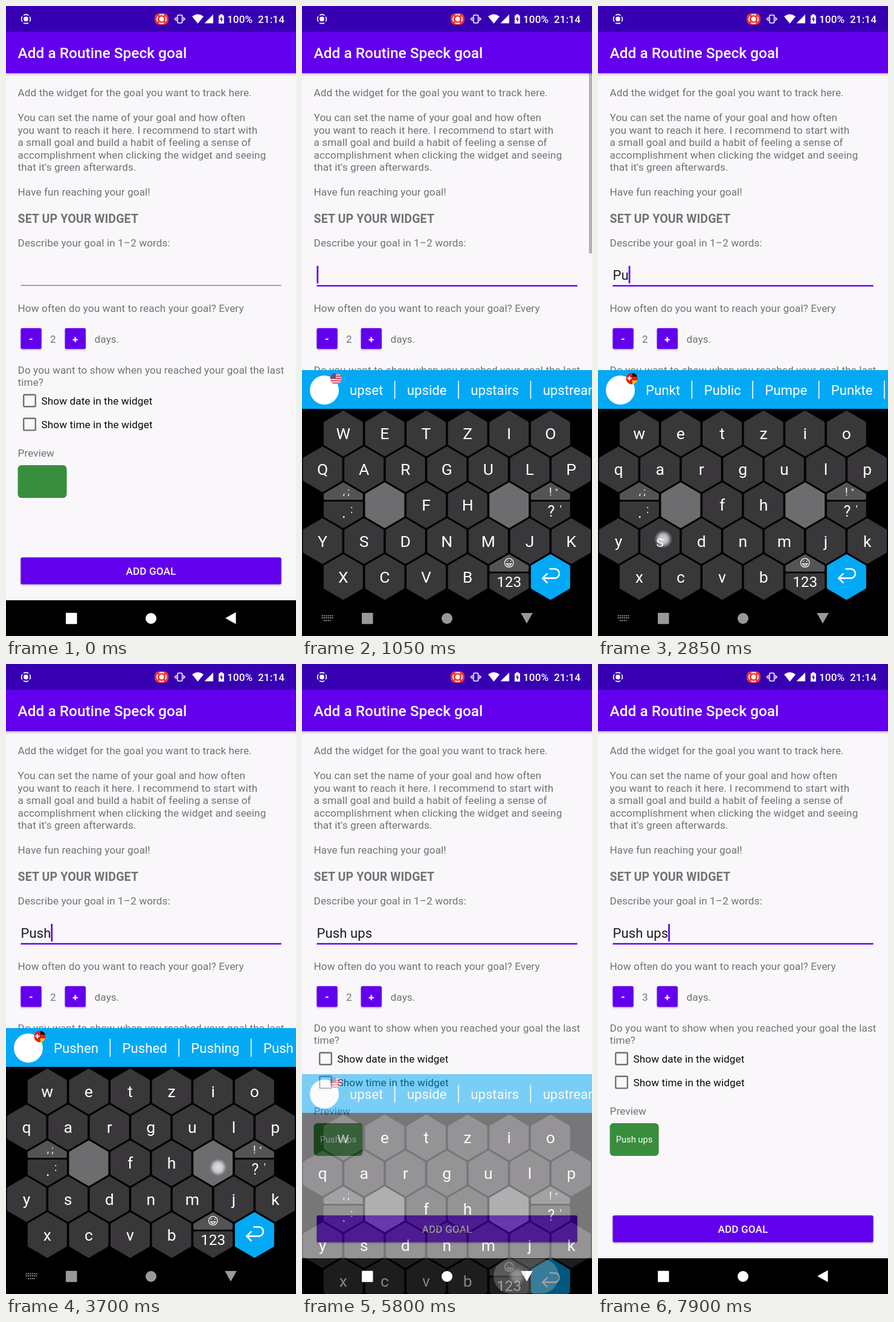
These frames come from a looping animation (480 px wide and 1040 px high, 8 s). An HTML page:

```html
<!DOCTYPE html>
<html lang="en">
<head>
<meta charset="utf-8">
<title>Goal setup</title>
<style>
  html, body { margin: 0; width: 100%; height: 100%; overflow: hidden; background: #f9f7fa; }
  svg { display: block; width: 100vw; height: 100vh; font-family: Roboto, sans-serif; }
  text { white-space: pre; }
  .m { text-anchor: middle; }
  .w { fill: #fff; }
  .med { font-weight: 500; }
  .body { font-size: 17.11px; letter-spacing: .11px; }
</style>
</head>
<body>
<svg id="stage" viewBox="0 0 480 1040" preserveAspectRatio="none">
  <defs>
    <filter id="shade" x="-20%" y="-30%" width="140%" height="170%">
      <feDropShadow dx="0" dy="1.5" stdDeviation="1.3" flood-color="#000" flood-opacity=".33"/>
    </filter>
    <linearGradient id="barShade" x1="0" y1="0" x2="0" y2="1">
      <stop offset="0" stop-color="#000" stop-opacity=".2"/>
      <stop offset="1" stop-color="#000" stop-opacity="0"/>
    </linearGradient>
    <radialGradient id="dot">
      <stop offset="0" stop-color="#fff" stop-opacity=".8"/>
      <stop offset=".55" stop-color="#f4f4fa" stop-opacity=".68"/>
      <stop offset=".8" stop-color="#dcdcea" stop-opacity=".4"/>
      <stop offset="1" stop-color="#70707c" stop-opacity=".22"/>
    </radialGradient>
    <clipPath id="badge"><circle cx="56" cy="615" r="9.5"/></clipPath>
    <clipPath id="plusBox"><rect x="97.6" y="531.7" width="34.3" height="34.4" rx="2.5"/></clipPath>
    <g id="rec" fill="none" stroke="#fff">
      <circle r="3.9" fill="#fff" stroke="none"/>
      <circle r="7.4" stroke-width="1.7" stroke-dasharray="8.6 3.02" stroke-dashoffset="4.3"/>
    </g>
  </defs>

  <rect width="480" height="1040" fill="#f9f7fa"/>
  <g id="page" class="body" fill="#727174"></g>

  <g id="form">
    <rect id="rule" x="24.4" y="460.7" width="431.2"/>
    <text id="input" x="24.4" y="452" font-size="22" letter-spacing=".13" fill="#1c1b1d"></text>
    <rect id="caret" y="429" width="2.7" height="29" fill="#6200ee"/>
    <g filter="url(#shade)" fill="#6200ee">
      <rect x="24.4" y="531.7" width="34.3" height="34.4" rx="2.5"/>
      <rect x="97.6" y="531.7" width="34.3" height="34.4" rx="2.5"/>
      <rect x="24.4" y="910.2" width="431.2" height="44.2" rx="2.5"/>
    </g>
    <circle id="plusGlow" cx="115" cy="549" r="24" fill="#fff" clip-path="url(#plusBox)"/>
    <g class="w m body">
      <text x="41.5" y="555" font-weight="700">-</text>
      <text x="114.7" y="556" font-weight="700">+</text>
      <text x="240" y="939" class="med">ADD GOAL</text>
    </g>
    <text id="count" class="body" x="73" y="556" fill="#727174"></text>
    <g fill="none" stroke="#727174" stroke-width="2.4">
      <rect x="29.2" y="641.7" width="19.6" height="19.6" rx="1.6"/>
      <rect x="29.2" y="680.8" width="19.6" height="19.6" rx="1.6"/>
    </g>
    <rect x="19.5" y="758" width="81" height="54" rx="6" fill="#388e3c"/>
    <text id="mini" class="w m" x="60" y="790.3" font-size="14.67"></text>
  </g>
  <rect id="cover" y="601" width="480" height="381" fill="#f9f7fa"/>
  <rect id="scroll" x="475" y="111" width="5" height="297.5" fill="#b3b1b5"/>

  <rect y="111" width="480" height="5" fill="url(#barShade)"/>
  <rect y="42" width="480" height="69" fill="#6200ee"/>
  <rect width="480" height="42.5" fill="#3700b3"/>
  <text class="w med" x="19.56" y="86.4" font-size="24.44">Add a Routine Speck goal</text>

  <g class="w">
    <use href="#rec" x="33" y="21.5"/>
    <rect x="246" y="12" width="23" height="19" rx="8" fill="#e53935"/>
    <use href="#rec" x="257.5" y="21.5"/>
    <rect x="284" y="15" width="7.6" height="13" rx="1" fill="none" stroke="#fff" stroke-width="1.6"/>
    <path d="M281.6 18v7M294 18v7M279.6 20v3M296 20v3" stroke="#fff" stroke-width="1.4"/>
    <path d="M317.5 29L308 17.2Q317.5 10 327 17.2Z"/>
    <path d="M328.5 28.5H343V14Z"/>
    <path d="M352 15.5h2.4v-2h4v2h2.4v13.5h-8.8z"/>
    <path d="M357 17l-3 5.4h2v4.6l3-5.6h-2z" fill="#3700b3"/>
    <g class="med body"><text x="366" y="28">100%</text><text x="417" y="28">21:14</text></g>
  </g>

  <rect y="981" width="480" height="59" fill="#000"/>
  <g id="board">
    <rect y="664" width="480" height="377" fill="#000"/>
    <rect y="601" width="480" height="64" fill="#03a9f4"/>
    <circle cx="37" cy="634" r="24" class="w"/>
    <g clip-path="url(#badge)">
      <g id="us">
        <rect x="46" y="605" width="20" height="20" fill="#f4f0f2"/>
        <path d="M46 607.2h20M46 611h20M46 614.8h20M46 618.6h20M46 622.4h20" stroke="#d0354a" stroke-width="1.9"/>
        <rect x="46" y="605" width="10" height="10" fill="#4a5a9a"/>
      </g>
      <g id="de">
        <rect x="46" y="605" width="20" height="20" fill="#e02020"/>
        <path d="M57 605h9v7h-9z" fill="#111"/>
        <path d="M57 618h9v7h-9z" fill="#fc0"/>
        <path d="M52 611v7M48.5 614.5h7" stroke="#fff" stroke-width="2.2"/>
      </g>
    </g>
    <g id="words" class="w" font-size="22.2"></g>
    <g id="keys"></g>
  </g>
  <rect id="ripple" x="317" y="982" width="108" height="57" rx="28.5" fill="#fff"/>
  <g id="nav">
    <rect x="99" y="1001.7" width="18.5" height="18.5" rx="1"/>
    <circle cx="240" cy="1011" r="9"/>
    <path id="back" d="M8.5-9.8V9.8L-9 0Z"/>
    <path id="kbd" d="M32.5 1006.5h19M32.5 1010h19M36 1014.5h12" fill="none" stroke="#8a8a8a" stroke-width="2" stroke-dasharray="2.2 1.2"/>
  </g>
  <circle id="touch" r="14" fill="url(#dot)" stroke="#8c8ca0" stroke-opacity=".3"/>
</svg>
<script>
const LOOP = 8000;
const $ = id => document.getElementById(id);
const set = (el, attrs) => { for (const k in attrs) el.setAttribute(k, attrs[k]); };
const add = (parent, tag, attrs, text) => {
  const el = document.createElementNS("http://www.w3.org/2000/svg", tag);
  set(el, attrs);
  if (text) el.textContent = text;
  parent.appendChild(el);
  return el;
};
const ramp = (t, start, length) => Math.min(1, Math.max(0, (t - start) / length));
const within = (t, a, b) => t >= a && t < b;

// Static page text: [baseline, text]
const MARGIN = 19.56;
[
  [149.4, "Add the widget for the goal you want to track here."],
  [190.3, "You can set the name of your goal and how often"],
  [210.8, "you want to reach it here. I recommend to start with"],
  [231.2, "a small goal and build a habit of feeling a sense of"],
  [251.7, "accomplishment when clicking the widget and seeing"],
  [272.1, "that it's green afterwards."],
  [313, "Have fun reaching your goal!"],
  [397, "Describe your goal in 1–2 words:"],
  [505, "How often do you want to reach your goal? Every"],
  [607, "Do you want to show when you reached your goal the last"],
  [627.3, "time?"],
  [744, "Preview"]
].forEach(([y, s]) => add($("page"), "text", { x: MARGIN, y }, s));
add($("page"), "text", { x: 146.6, y: 556 }, "days.");
add($("page"), "text", { x: MARGIN, y: 358.2, "font-size": 19.56, "font-weight": 700 }, "SET UP YOUR WIDGET");
["date", "time"].forEach((s, i) =>
  add($("page"), "text", { x: 58.5, y: 658.2 + 39.1 * i, fill: "#0b0b0b" }, `Show ${s} in the widget`));

// Honeycomb keyboard: "_" space, "." and "!" split punctuation, "#" digits, "<" return
const ROWS = ["wetzio", "qargulp", "._fh_!", "ysdnmjk", "xcvb#<"];
const DARK = "#39373a", LIGHT = "#545355";
const letters = [];
const keys = $("keys");

function shape(d, color) {
  add(keys, "path", { d, fill: color, stroke: color, "stroke-width": 5, "stroke-linejoin": "round" });
}
function label(x, y, size, s) {
  return add(keys, "text", { x, y, class: "m w", "font-size": size }, s);
}
function hex(x, y, color) {
  shape(`M${x} ${y - 35}l30 17.5v35l-30 17.5l-30-17.5v-35z`, color);
}
function splitHex(x, y) {
  shape(`M${x} ${y - 35}l30 17.5v6.2h-60v-6.2z`, LIGHT);
  shape(`M${x - 30} ${y - 3.6}h60v21.1l-30 17.5l-30-17.5z`, DARK);
}
ROWS.forEach((row, r) => [...row].forEach((c, i) => {
  const x = (row.length === 6 ? 68.3 : 34) + 68.6 * i, y = 705.6 + 59.25 * r;
  if (c === "_") hex(x, y, "#6d6c6e");
  else if (c === "<") {
    hex(x, y, "#03a9f4");
    add(keys, "path", {
      d: `M${x - 12} ${y + 2}h19a7.7 7.7 0 0 0 0-15.4h-9M${x - 5} ${y - 6}l-8 8l8 8`,
      fill: "none", stroke: "#fff", "stroke-width": 2.6
    });
  } else if (c === ".") {
    splitHex(x, y);
    label(x + 5, y - 17, 17, ", ;");
    label(x + 1, y + 21, 25, ".");
    label(x + 14, y + 13, 18, ":");
  } else if (c === "!") {
    splitHex(x, y);
    label(x, y - 16, 18, "!");
    label(x + 10, y - 16, 14, '"');
    label(x + 1, y + 19, 25, "?");
    label(x + 17, y + 14, 18, "'");
  } else if (c === "#") {
    splitHex(x, y);
    const face = { fill: "none", stroke: "#fff", "stroke-width": 1.3 };
    add(keys, "circle", { cx: x, cy: y - 23.5, r: 7.3, ...face });
    add(keys, "path", { d: `M${x - 4} ${y - 22}q4 6.5 8 0zM${x - 3} ${y - 27}v2M${x + 3} ${y - 27}v2`, ...face });
    label(x, y + 16, 24.3, "123");
  } else {
    hex(x, y, DARK);
    letters.push([label(x, y + 9.2, 26.5, c), c]);
  }
}));

// Taps: [down, up, x, y, typed character]
const TAPS = [
  [400, 650, 300, 431],
  [1650, 1800, 452, 754, "P"],
  [2260, 2420, 311, 768, "u"],
  [2720, 2880, 108, 880, "s"],
  [3160, 3310, 279, 826, "h"],
  [3600, 3780, 351, 831, " "],
  [4020, 4160, 312, 766, "u"],
  [4360, 4500, 449, 763, "p"],
  [4640, 4780, 112, 877, "s"],
  [5450, 5680, 356, 1010],
  [6800, 6980, 115, 549]
];
const FADE = 220;

// Suggestions: [time, flag, words]
const HINTS = [
  [0, "us", "upset upside upstairs upstream"],
  [1840, "de", "Profit Politik Passiert Planet"],
  [2520, "de", "Punkt Public Pumpe Punkte"],
  [2980, "de", "Push Pusht Pushen Pushed"],
  [3410, "de", "Pushen Pushed Pushing Push"],
  [3880, "us", "ups up button notifications"],
  [4260, "us", "up until under update"],
  [4600, "us", "upgrade updaten upside up"],
  [4900, "us", "upset upside upstairs upstream"]
];
let shown;
function showHints(hint) {
  if (shown === hint) return;
  shown = hint;
  const box = $("words");
  box.textContent = "";
  let x = 79;
  for (const word of hint[2].split(" ")) {
    x += add(box, "text", { x, y: 642 }, word).getComputedTextLength() + 19.4;
    add(box, "rect", { x: x - 0.8, y: 618.5, width: 1.6, height: 30 });
    x += 20.2;
  }
  $("us").style.display = hint[1] === "us" ? "" : "none";
  $("de").style.display = hint[1] === "de" ? "" : "none";
}

function draw(t) {
  const typed = TAPS.filter(p => p[4] && t >= p[1]);
  const text = typed.map(p => p[4]).join("");
  const focused = t >= 650;

  $("input").textContent = text;
  $("mini").textContent = text;
  $("count").textContent = t < 6980 ? "2" : "3";
  set($("rule"), focused ? { height: 2.4, fill: "#6200ee" } : { height: 1.2, fill: "#727174" });

  const base = typed.length === 8 ? 4850 : typed.length ? typed[typed.length - 1][1] : 650;
  const lit = focused && (t - base) % 1000 < 500;
  set($("caret"), { x: 24.4 + (text ? $("input").getComputedTextLength() : 0), opacity: lit ? 1 : 0 });

  // Keyboard slides in decelerating, leaves accelerating
  const rest = 1 - ramp(t, 700, 230), out = ramp(t, 5700, 243);
  const inGap = rest * rest;
  const shift = 439 * Math.max(inGap, out * out);
  const alpha = Math.min(1 - inGap, Math.max(0, 1 - 1.16 * out));
  set($("board"), { transform: `translate(0 ${Math.round(shift)})`, opacity: alpha });
  letters.forEach(([el, c]) => { el.textContent = text ? c : c.toUpperCase(); });
  showHints(HINTS.filter(h => t >= h[0]).pop());

  set($("cover"), { opacity: within(t, 700, 5720) ? 1 : 0 });
  set($("scroll"), { opacity: ramp(t, 700, 60) * (1 - ramp(t, 2000, 250)) });

  // Navigation bar
  const dim = ramp(t, 750, 60) * (1 - ramp(t, 5690, 80));
  const g = Math.round(255 - 102 * dim);
  set($("nav"), { fill: `rgb(${g},${g},${g})` });
  const turn = ramp(t, 850, 150) * (1 - ramp(t, 5850, 150));
  set($("back"), { transform: `translate(372 1010.5) rotate(${-90 * turn})` });
  set($("kbd"), { opacity: within(t, 900, 5720) ? 1 : 0 });
  set($("ripple"), { opacity: 0.24 * ramp(t, 5450, 150) * (1 - ramp(t, 5750, 600)) });
  set($("plusGlow"), { opacity: 0.25 * ramp(t, 6800, 100) * (1 - ramp(t, 6980, 300)) });

  const tap = TAPS.find(p => within(t, p[0], p[1] + FADE));
  set($("touch"), tap
    ? { cx: tap[2], cy: tap[3], opacity: ramp(t, tap[0] - 20, 70) * (1 - ramp(t, tap[1], FADE)) }
    : { opacity: 0 });
}

const start = performance.now();
function tick(now) {
  draw(Math.max(0, now - start) % LOOP);
  requestAnimationFrame(tick);
}
draw(0);
requestAnimationFrame(tick);
</script>
</body>
</html>
```
